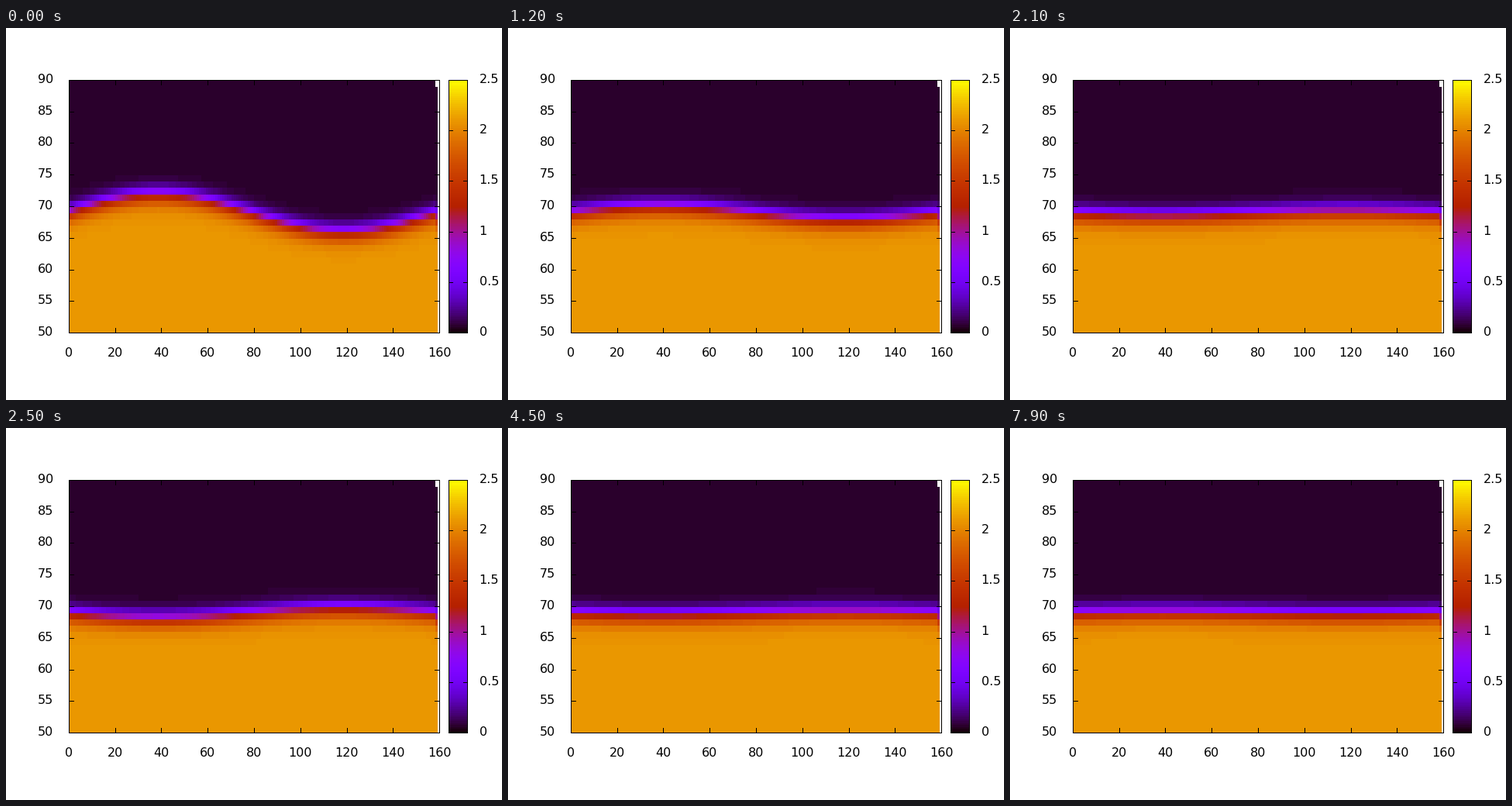
These frames come from a looping animation (640x480 px, 8000 ms). A matplotlib script:

```python
import matplotlib.pyplot as plt
import numpy as np
from matplotlib.animation import FuncAnimation

W, H, DPI = 640, 480, 100
FRAMES, STEP = 80, 100
LEFT, RIGHT, TOP, BOTTOM = 81, 559, 67, 393
BAR_L, BAR_R = 571, 595
SX, SY = (RIGHT - LEFT) / 160, (BOTTOM - TOP) / 40
VMAX, LEVELS = 2.5, 128
GAS, LIQUID = .065, 2.1

# Wave height (grid rows) over time (seconds)
KEY_T = np.array([0, .6, 1.2, 1.7, 2.1, 2.5, 3.0, 3.5, 4.5, 5.2, 6.0, 7.0, 7.9])
KEY_A = np.array([3.0, 2.15, 1.1, .22, -.4, -.8, -.97, -.85, -.28, -.07, .07, .17, .2])
SLOPE = np.gradient(KEY_A, KEY_T)


def palette(gray):
    """Black, violet, red, yellow: sqrt(x), x^3, sin(2 pi x)."""
    g = (np.minimum(np.floor(gray * LEVELS), LEVELS - 1) + .5) / LEVELS
    rgb = [np.sqrt(g), g ** 3, np.clip(np.sin(2 * np.pi * g), 0, 1)]
    return (np.stack(rgb, -1) * 255).round().astype(np.uint8)


def amplitude(t):
    """Cubic Hermite curve through the keys."""
    i = min(np.searchsorted(KEY_T, t, side="right") - 1, len(KEY_T) - 2)
    h = KEY_T[i + 1] - KEY_T[i]
    s = (t - KEY_T[i]) / h
    return ((1 + 2 * s) * (1 - s) ** 2 * KEY_A[i] + s * (1 - s) ** 2 * h * SLOPE[i]
            + s * s * (3 - 2 * s) * KEY_A[i + 1] + s * s * (s - 1) * h * SLOPE[i + 1])


def density(t):
    """Cell values, top row first; the interface is sharper on the gas side."""
    x = np.arange(159) + .5
    y = 89.5 - np.arange(40)[:, None]
    depth = 68.98 + amplitude(t) * np.cos(2 * np.pi * (x - 38.5) / 160) - y
    mix = np.tanh(depth / np.where(depth < 0, 1.3, 1.72))
    return (LIQUID + GAS) / 2 + (LIQUID - GAS) / 2 * mix


# Cell under each pixel of the map
px = np.arange(LEFT + 1, 557)
py = np.arange(TOP + 1, BOTTOM)
COLS = ((px - LEFT) / SX).astype(int)
ROWS = ((py - TOP - .4) / SY).astype(int)


def draw_map(t):
    value = density(t)
    # The last column is skewed by one row, leaving a gap on top
    value[1:, -1] = (value[1:, -1] + value[:-1, -1]) / 2
    cells = palette(value / VMAX)
    cells[0, -1] = 255
    return cells[ROWS[:, None], COLS]


def line(img, x0, y0, x1, y1):
    """One-pixel black line, both ends included."""
    img[y0:y1 + 1, x0:x1 + 1] = 0


def box(img, x0, x1):
    for y in (TOP, BOTTOM):
        line(img, x0, y, x1, y)
    for x in (x0, x1):
        line(img, x, TOP, x, BOTTOM)


def side_ticks(img, x0, x1, y, size):
    line(img, x0, y, x0 + size, y)
    line(img, x1 - size, y, x1, y)


def x_pixel(v):
    return round(LEFT + v * SX)


def y_pixel(v):
    return round(BOTTOM - (v - 50) * SY)


def bar_pixel(v):
    return round(BOTTOM - v / VMAX * (BOTTOM - TOP))


X_TICKS = range(0, 161, 20)
Y_TICKS = range(50, 91, 5)
BAR_TICKS = np.arange(0, 2.6, .5)


def draw_axes(img):
    box(img, LEFT, RIGHT)
    box(img, BAR_L, BAR_R)
    for v in X_TICKS:
        x = x_pixel(v)
        line(img, x, TOP, x, TOP + 6)
        line(img, x, BOTTOM - 6, x, BOTTOM)
    for v in Y_TICKS:
        side_ticks(img, LEFT, RIGHT, y_pixel(v), 6)
    for v in BAR_TICKS:
        side_ticks(img, BAR_L, BAR_R, bar_pixel(v), 5)


canvas = np.full((H, W, 3), 255, np.uint8)
bar = palette((BOTTOM - py) / (BOTTOM - TOP))
canvas[TOP + 1:BOTTOM, BAR_L + 1:BAR_R] = bar[:, None]

fig = plt.figure(figsize=(W / DPI, H / DPI), dpi=DPI, facecolor="white")
ax = fig.add_axes([0, 0, 1, 1])
ax.axis("off")
image = ax.imshow(canvas, extent=(0, W, H, 0), interpolation="nearest", aspect="auto")
ax.set(xlim=(0, W), ylim=(H, 0))


def label(x, y, text, ha):
    ax.text(x, y, text, ha=ha, va="baseline", family="DejaVu Sans",
            size=16 * 72 / DPI, color="black")


for v in X_TICKS:
    label(x_pixel(v), 424, str(v), "center")
for v in Y_TICKS:
    label(61, y_pixel(v) + 4, str(v), "right")
for v in BAR_TICKS:
    label(610.5, bar_pixel(v) + 4, f"{v:g}", "left")


def update(frame):
    canvas[TOP + 1:BOTTOM, LEFT + 1:557] = draw_map(frame * STEP / 1000)
    draw_axes(canvas)
    image.set_data(canvas)
    return [image]


anim = FuncAnimation(fig, update, frames=FRAMES, interval=STEP, repeat=True,
                     repeat_delay=0, blit=False)
plt.show()
```
